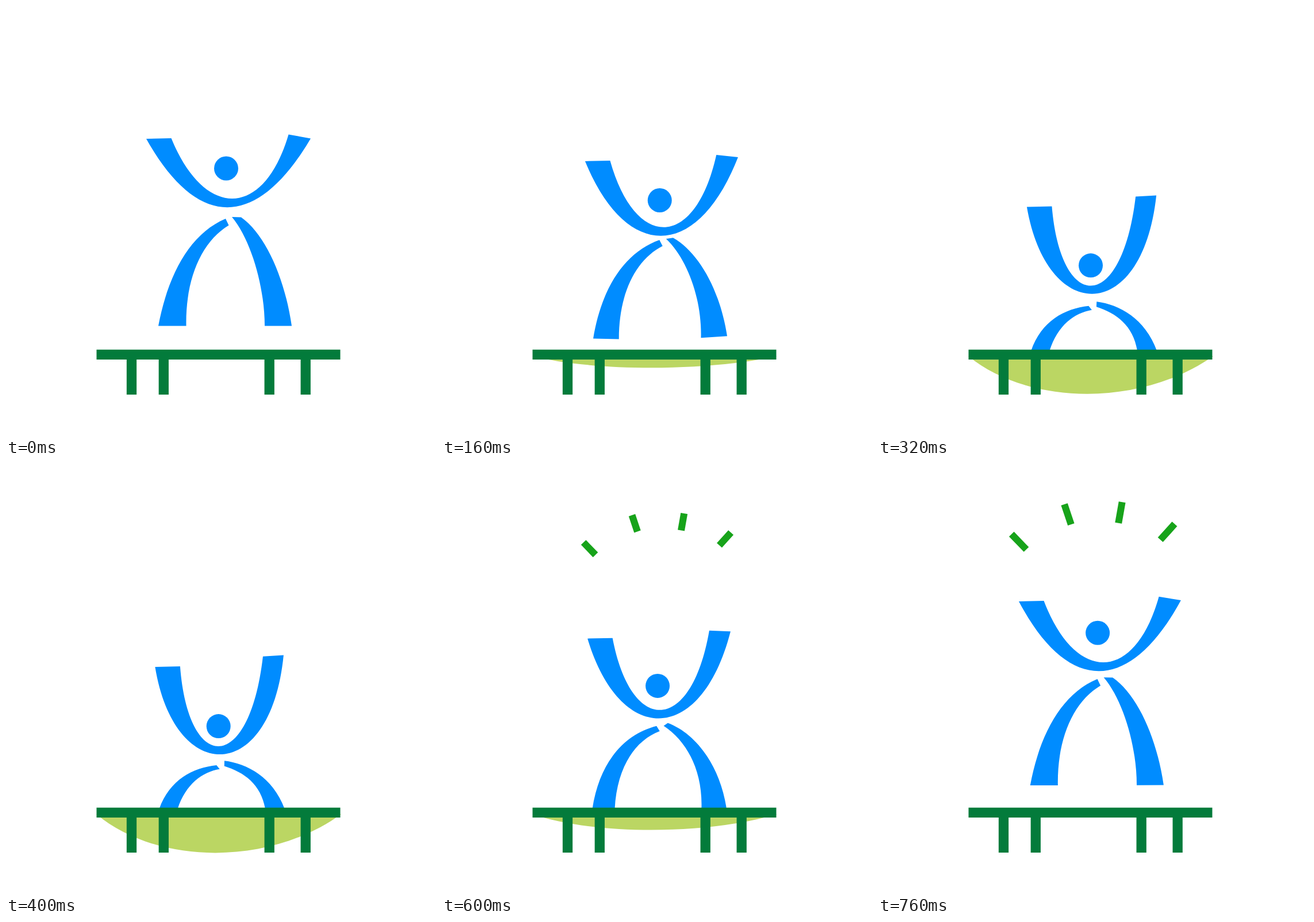
An HTML page that plays this animation: 748x748 px, repeating every 800 ms.

```html
<!DOCTYPE html>
<html lang="en">
<head>
<meta charset="utf-8">
<title>Trampoline jump</title>
<style>
  html, body { margin: 0; width: 100%; height: 100%; overflow: hidden; background: #fff; }
  svg { display: block; width: 100vw; height: 100vh; }
</style>
</head>
<body>
<svg viewBox="0 0 748 748">
  <defs>
    <clipPath id="above"><rect width="748" height="600"/></clipPath>
    <path id="ray" stroke="#17a31a" stroke-width="12"/>
  </defs>
  <path id="sag" fill="#bbd663"/>
  <g fill="#008cff">
    <g clip-path="url(#above)">
      <path id="legL"/>
      <path id="legR"/>
    </g>
    <path id="arms"/>
    <circle id="head" r="21"/>
  </g>
  <path stroke="#037b3b" stroke-width="17.3"
    d="M157.5 606.4H581.5M218.5 610V676M274.3 610V676M458.2 610V676M521.2 610V676"/>
  <use href="#ray" transform="translate(267 158) rotate(-44)"/>
  <use href="#ray" transform="translate(340 117.5) rotate(-18.5)"/>
  <use href="#ray" transform="translate(416 115.5) rotate(10)"/>
  <use href="#ray" transform="translate(482.5 141.5) rotate(42)"/>
</svg>
<script>
const LOOP = 800, STEP = 40, LOWEST = 386;
const $ = id => document.getElementById(id);
const mix = (a, b, k) => a + (b - a) * k;

// Standing and crouched outline of each limb
const limbs = {
  arms: [
    'M244 231C333 390 436 390 530 230.5L491.5 223.5C448 371 345 371 287.5 230Z',
    'M259 350C294 555 460 555 484 330L448 332C424 536 318 536 302.5 349Z'
  ],
  legL: [
    'M382 370C320 396 282 467 265 556.5L313.5 556.5C312 475 340 410 387.5 381.5Z',
    'M366.5 521C314 527 264 559 257 646L290 650C294 570 332 535 372 528Z'
  ],
  legR: [
    'M393 367C427 408 450 490 450 556.5L497 556.5C485 474 452 398 409 367.5Z',
    'M380 522.5C424 537 459 567 452 641L493 629C479 551 426 519.5 380.5 513.5Z'
  ]
};

// S-curve from 0 to 1: power sets the steepness, lag > 1 delays the middle
function ease(x, power, lag) {
  x = Math.min(1, Math.max(0, x));
  const a = x ** power;
  return a / (a + lag * (1 - x) ** power);
}

// Goes down from start to LOWEST, then back up until end
function dip(t, { start, end, down, up }) {
  return t < LOWEST
    ? ease((t - start) / (LOWEST - start), ...down)
    : 1 - ease((t - LOWEST) / (end - LOWEST), ...up);
}

const body = { start: 0, end: 820, down: [2.2, 1], up: [1.645, 1.4] };
const legs = { start: 80, end: 820, down: [2.3, .29], up: [2.06, 1.19] };
const mat = { start: 140, end: 700, down: [1.3, .1], up: [1.8, 2.72] };

function pose(id, k) {
  const [tall, low] = limbs[id];
  const ends = low.match(/[\d.]+/g);
  let i = 0;
  $(id).setAttribute('d', tall.replace(/[\d.]+/g, n => mix(+n, +ends[i++], k).toFixed(2)));
}

function draw(t) {
  const fall = 1.027 * dip(t, body), bend = 1.02 * dip(t, legs);
  pose('arms', fall);
  pose('legL', bend);
  pose('legR', bend);
  $('head').setAttribute('cx', mix(383, 370, fall));
  $('head').setAttribute('cy', mix(282.5, 452, fall));

  const low = 609 + 90 * dip(t, mat);
  $('sag').setAttribute('d', `M157 609C265 ${low} 459 ${low} 583 609Z`);

  const grow = Math.max(0, (t - 465) / 295), leave = Math.max(0, (t - 600) / 160);
  const tip = 50 * (1 - Math.max(0, 1 - grow) ** 1.5), tail = 13 * leave ** 1.5;
  $('ray').setAttribute('d', `M0 ${-tail}V${-tip}`);
}

let start;
function tick(now) {
  start ??= now;
  draw(Math.floor((now - start) % LOOP / STEP) * STEP);
  requestAnimationFrame(tick);
}
draw(0);
requestAnimationFrame(tick);
</script>
</body>
</html>
```
